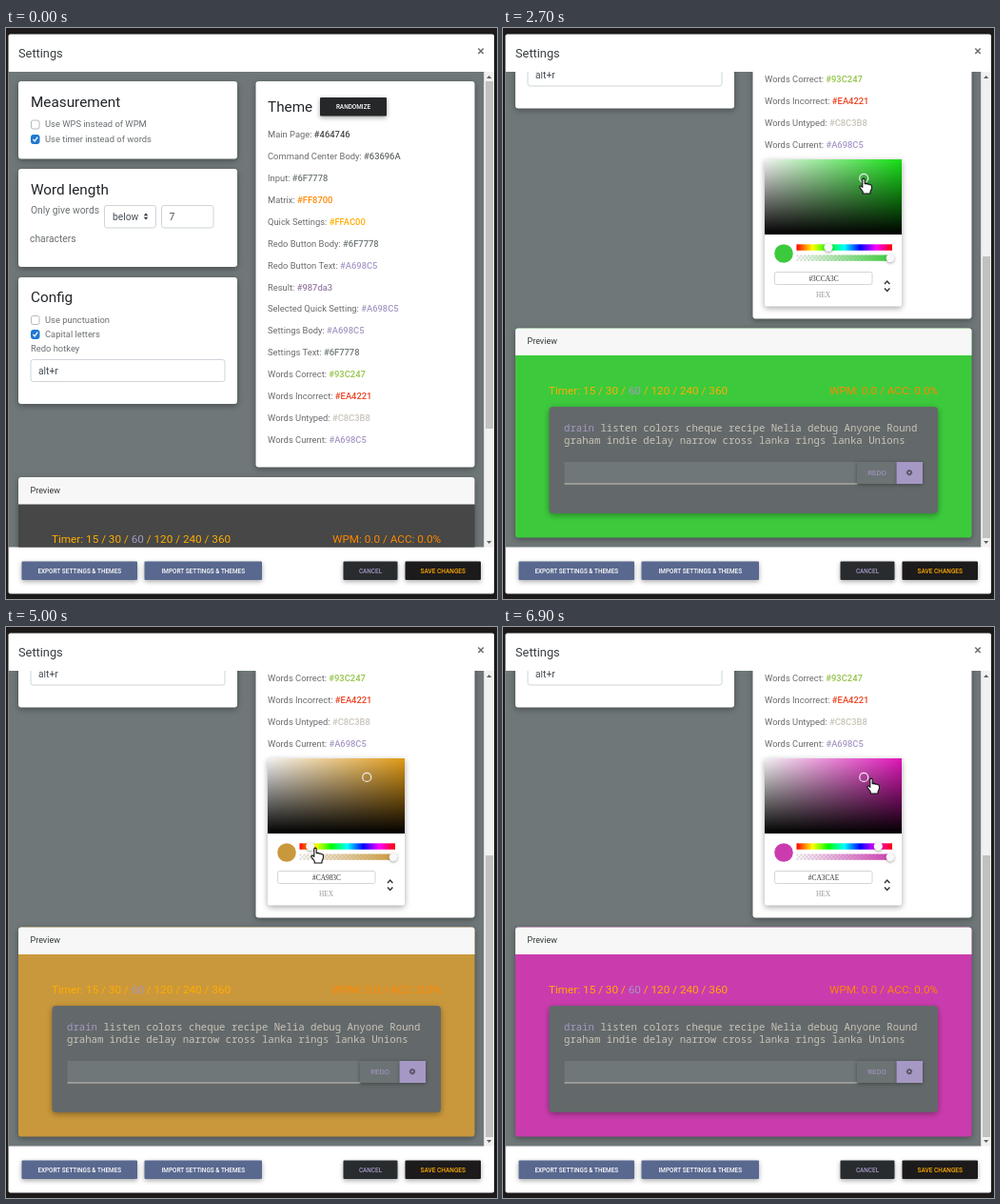
An HTML page with a canvas for the animation above (7000 ms loop, 516 by 600 pixels).

```html
<!DOCTYPE html>
<html lang="en">
<head>
<meta charset="utf-8">
<title>Settings</title>
<style>
html, body { margin: 0; width: 100%; height: 100%; overflow: hidden; background: #1c1a1b; }
canvas { display: block; width: 516px; height: 600px; }
</style>
</head>
<body>
<canvas id="stage"></canvas>
<script>
const W = 516, H = 600, LOOP = 7000, STEP = 100;
const canvas = document.getElementById('stage');
const ctx = canvas.getContext('2d');
const dpr = window.devicePixelRatio || 1;
canvas.width = W * dpr;
canvas.height = H * dpr;

const SANS = 'Roboto, sans-serif';
const MONO = '"Noto Sans Mono", monospace';
const SERIF = '"Liberation Serif", serif';
const SLATE = '#6f7778', LILAC = '#a698c5', ORANGE = '#ffac00';
const OPEN_AT = 700, MAX_SCROLL = 310.5, GROWTH = 155;

const THEME = [
  ['Main Page', '#464746'], ['Command Center Body', '#63696A'], ['Input', '#6F7778'],
  ['Matrix', '#FF8700'], ['Quick Settings', '#FFAC00'], ['Redo Button Body', '#6F7778'],
  ['Redo Button Text', '#A698C5'], ['Result', '#987da3'], ['Selected Quick Setting', '#A698C5'],
  ['Settings Body', '#A698C5'], ['Settings Text', '#6F7778'], ['Words Correct', '#93C247'],
  ['Words Incorrect', '#EA4221'], ['Words Untyped', '#C8C3B8'], ['Words Current', '#A698C5']
];

// Keyframes: [time, ...values]
const SCROLL = [[1200, 0], [1600, MAX_SCROLL]];
const HUE = [[3500, 120], [4300, 46], [4400, 46], [4900, 39], [5100, 39], [5700, 180], [6300, 311.8]];
const SHADE = [[2000, 0.014, 0.278], [2700, 0.703, 0.792]];
const POINTER = [
  [100, 420, 250], [600, 343, 110], [1200, 343, 110], [1600, 388, 262], [1800, 385, 257],
  [2000, 281, 199], [2700, 379, 158], [2900, 379, 158], [3400, 339, 232], [3500, 339, 232],
  [4300, 325, 231], [5000, 325, 232], [5100, 325, 232], [5700, 364, 234], [6300, 397, 233],
  [6500, 397, 233], [6900, 387, 159]
];

function tween(keys, t) {
  if (t <= keys[0][0]) return keys[0].slice(1);
  for (let i = 1; i < keys.length; i++) {
    const a = keys[i - 1], b = keys[i];
    if (t <= b[0]) {
      const k = (t - a[0]) / (b[0] - a[0]);
      return a.slice(1).map((v, j) => v + (b[j + 1] - v) * k);
    }
  }
  return keys[keys.length - 1].slice(1);
}

function hsvHex(h, s, v) {
  const channel = n => {
    const k = (n + h / 60) % 6;
    const c = v - v * s * Math.max(0, Math.min(k, 4 - k, 1));
    return Math.round(c * 255).toString(16).padStart(2, '0');
  };
  return ('#' + channel(5) + channel(3) + channel(1)).toUpperCase();
}

function box(x, y, w, h, fill, { r = 0, stroke, shadow = 0 } = {}) {
  ctx.save();
  ctx.beginPath();
  ctx.roundRect(x, y, w, h, r);
  if (shadow) {
    ctx.shadowColor = 'rgba(0,0,0,.35)';
    ctx.shadowBlur = shadow * dpr;
    ctx.shadowOffsetY = shadow * 0.35 * dpr;
  }
  ctx.fillStyle = fill;
  ctx.fill();
  ctx.restore();
  if (stroke) {
    ctx.lineWidth = 1;
    ctx.strokeStyle = stroke;
    ctx.stroke();
  }
}

function disc(x, y, r, fill, shadow) {
  box(x - r, y - r, 2 * r, 2 * r, fill, { r, shadow });
}

// Returns the x where the text ends
function text(str, x, y, size, color, { weight = 400, family = SANS, align = 'left' } = {}) {
  ctx.font = `${weight} ${size}px ${family}`;
  ctx.textAlign = align;
  ctx.fillStyle = color;
  ctx.fillText(str, x, y);
  return x + ctx.measureText(str).width;
}

function line(points, color, width) {
  ctx.beginPath();
  points.forEach(([x, y]) => ctx.lineTo(x, y));
  ctx.strokeStyle = color;
  ctx.lineWidth = width;
  ctx.stroke();
}

function triangle(x, y, w, h, color) {
  ctx.beginPath();
  ctx.moveTo(x - w, y);
  ctx.lineTo(x + w, y);
  ctx.lineTo(x, y + h);
  ctx.fillStyle = color;
  ctx.fill();
}

function button(label, x, y, w, h, fill, color, size = 6.4) {
  box(x, y, w, h, fill, { r: 1, shadow: 5 });
  text(label, x + w / 2, y + h / 2 + size * 0.36, size, color, { weight: 500, align: 'center' });
}

const card = (x, y, w, h) => box(x, y, w, h, '#fff', { r: 3, shadow: 6 });
const heading = (label, x, y) => text(label, x, y, 15.3, '#212529');
const field = (x, y, w, h) => box(x + 0.5, y + 0.5, w - 1, h - 1, '#fff', { r: 2.5, stroke: '#ced4da' });

function checkbox(label, y, on) {
  box(26.5, y - 4, 8.5, 9, on ? '#1f78d1' : '#fff', { r: 2, stroke: on ? '#1f78d1' : '#b4babf' });
  if (on) line([[28.5, 0.5 + y], [30.2, y + 2.4], [33.2, y - 1.8]], '#fff', 1.3);
  text(label, 41, y + 3.2, 9.4, '#6b6f72');
}

function drawOptions() {
  card(13, 56, 230, 81.5);
  heading('Measurement', 26, 83);
  checkbox('Use WPS instead of WPM', 101, false);
  checkbox('Use timer instead of words', 116.5, true);

  card(13, 148, 230, 103);
  heading('Word length', 26, 174.5);
  text('Only give words', 26, 195, 10.3, '#6b6f72');
  field(103, 186, 55, 24.5);
  text('below', 112, 201.7, 10.3, '#495057');
  triangle(147, 197.2, 2.3, -2.7, '#343a40');
  triangle(147, 198.8, 2.3, 2.7, '#343a40');
  field(163, 186, 55.5, 24.5);
  text('7', 171.5, 201.7, 10.3, '#495057');
  text('characters', 25, 225, 10.3, '#6b6f72');

  card(13, 262, 230, 133);
  heading('Config', 26, 288);
  checkbox('Use punctuation', 306.5, false);
  checkbox('Capital letters', 321.5, true);
  text('Redo hotkey', 26, 339.7, 9.4, '#6b6f72');
  field(25.5, 348, 205, 24);
  text('alt+r', 34, 363.7, 10.3, '#495057');
}

function drawTheme(open, main) {
  card(262.5, 56, 230, open ? 405 + GROWTH : 405.5);
  heading('Theme', 275, 88);
  button('RANDOMIZE', 330, 73, 70, 19.5, '#252729', '#fff');
  THEME.forEach(([label, value], i) => {
    const y = 115 + i * 22.93;
    const hex = i ? value : main;
    const end = text(label + ': ', 275, y, 9.4, '#6b6b6b');
    text(hex, end, y, 9.4, hex, { weight: 500 });
  });
}

function gradientBar(x, y, w, h, colors) {
  const g = ctx.createLinearGradient(x, 0, x + w, 0);
  colors.forEach((c, i) => g.addColorStop(i / (colors.length - 1), c));
  ctx.fillStyle = g;
  ctx.fillRect(x, y, w, h);
}

function drawPicker(hue, sat, val, color) {
  const x = 275, y = 448.5, w = 144, h = 79;
  box(x, y, w, 154.5, '#fff', { r: 2, shadow: 6 });
  gradientBar(x, y, w, h, ['#f2f2f2', hsvHex(hue, 0.9, 0.88)]);
  const dark = ctx.createLinearGradient(0, y, 0, y + h);
  dark.addColorStop(0, 'rgba(0,0,0,0)');
  dark.addColorStop(1, '#000');
  ctx.fillStyle = dark;
  ctx.fillRect(x, y, w, h);
  ctx.beginPath();
  ctx.arc(x + 3 + sat * w, y + 3.5 + (1 - val) * h, 4.5, 0, 2 * Math.PI);
  ctx.lineWidth = 1.2;
  ctx.strokeStyle = '#eee';
  ctx.stroke();

  disc(295, y + 99, 9.8, color);
  gradientBar(308.5, y + 89.3, 100.5, 6.5,
    ['#f00', '#ff0', '#0f0', '#0ff', '#00f', '#f0f', '#f00']);
  disc(309.2 + hue * 0.273, y + 92.5, 4.6, '#f8f8f8', 3);

  for (let i = 0; i < 50; i++) {
    for (let j = 0; j < 3; j++) {
      ctx.fillStyle = (i + j) % 2 ? '#fff' : '#d8d8d8';
      ctx.fillRect(308.5 + i * 2, y + 100.5 + j * 2.1, 2, 2.1);
    }
  }
  gradientBar(308.5, y + 100.5, 100.5, 6.3, [color + '00', color]);
  disc(407, y + 103.8, 4.4, '#f8f8f8', 3);

  box(285.5, y + 118.5, 102.5, 13, '#fff', { r: 2, stroke: '#d5d5d5' });
  text(color, 337, y + 127.8, 7.4, '#333', { family: SERIF, align: 'center' });
  text('HEX', 336.5, y + 145, 7.4, '#969696', { family: SERIF, align: 'center' });
  line([[401, y + 131], [403.7, y + 128], [406.4, y + 131]], '#333', 1.4);
  line([[401, y + 135.5], [403.7, y + 138.5], [406.4, y + 135.5]], '#333', 1.4);
}

function drawGear(x, y) {
  ctx.beginPath();
  for (let i = 0; i < 32; i++) {
    const a = i / 32 * 2 * Math.PI;
    const r = i % 4 < 2 ? 3.4 : 2.6;
    ctx.lineTo(x + r * Math.cos(a), y + r * Math.sin(a));
  }
  ctx.fillStyle = '#55505f';
  ctx.fill();
  disc(x, y, 1.1, LILAC);
}

function drawPreview(y, main) {
  box(13, y, 479.5, 220, main, { r: 3, shadow: 6 });
  box(13, y, 479.5, 28.5, '#f7f7f7', { r: [3, 3, 0, 0] });
  text('Preview', 25.5, y + 16.5, 9, '#33373a');

  let x = text('Timer: 15 / 30 / ', 48, y + 69.3, 11.72, ORANGE);
  x = text('60', x, y + 69.3, 11.72, LILAC);
  text(' / 120 / 240 / 360', x, y + 69.3, 11.72, ORANGE);
  text('WPM: 0.0 / ACC: 0.0%', 343, y + 69.3, 11.72, '#ff8700');

  box(48.5, y + 82.5, 408.5, 112, '#63696a', { r: 4, shadow: 6 });
  const mono = { family: MONO };
  x = text('drain', 64, y + 108.5, 10.68, LILAC, mono);
  text(' listen colors cheque recipe Nelia debug Anyone Round', x, y + 108.5, 10.68, '#c8c3b8', mono);
  text('graham indie delay narrow cross lanka rings lanka Unions', 64, y + 121.3, 10.68, '#c8c3b8', mono);

  box(64.5, y + 140.5, 308, 23, SLATE);
  box(64.5, y + 163, 308, 1, '#c8c3b8');
  box(372, y + 140.5, 41.5, 23, '#6c7375', { shadow: 4 });
  text('REDO', 393, y + 154.5, 7.8, LILAC, { align: 'center' });
  box(413.5, y + 140.5, 27.5, 23, LILAC, { shadow: 4 });
  drawGear(427, y + 151.7);
}

function drawScrollbar(open, scroll) {
  box(502.5, 46, 10.5, 499.5, '#f1f1f1');
  triangle(507.7, 53, 2.6, -3, '#606060');
  triangle(507.7, 539, 2.6, 3, '#606060');
  box(504, 56 + scroll / MAX_SCROLL * 184, 8, open ? 296 : 365, '#c1c1c1');
}

function drawFrame() {
  text('Settings', 13, 31, 12.8, '#3a3e41');
  line([[496.3, 21.5], [501.7, 27]], '#6d6d6d', 1.5);
  line([[501.7, 21.5], [496.3, 27]], '#6d6d6d', 1.5);
  button('EXPORT SETTINGS & THEMES', 16.5, 560.5, 121.5, 19.5, '#59688f', '#fff');
  button('IMPORT SETTINGS & THEMES', 145.5, 560.5, 123.5, 19.5, '#59688f', '#fff');
  button('CANCEL', 354.5, 560.5, 57, 19.5, '#282c2e', LILAC);
  button('SAVE CHANGES', 419.5, 560.5, 79.5, 19.5, '#1c1a1a', ORANGE, 6.5);
}

const ARROW = new Path2D('M0 0V11.5L2.6 9.1L4.3 13L6.2 12.2L4.5 8.4H8Z');
const HAND = new Path2D('M-1.2 .8Q0-.6 1.2 .8V5.6L3 5.4Q4 5.4 4.3 6.2Q6 5.7 6.4 6.8Q8.4 6.4 8.4 8.2' +
  'V11L7 14V16H-.8V14L-4.2 9.4Q-4.2 7.6-2.4 8.2L-1.2 9.4Z');

function drawPointer(t) {
  if (t < 100) return;
  const [x, y] = tween(POINTER, t);
  const hand = (t >= 600 && t < 1300) || t >= 2000;
  const shape = hand ? HAND : ARROW;
  ctx.save();
  ctx.translate(x, y);
  ctx.lineJoin = 'round';
  ctx.lineWidth = 1.1;
  ctx.fillStyle = '#fff';
  ctx.strokeStyle = '#111';
  ctx.fill(shape);
  ctx.stroke(shape);
  ctx.restore();
}

function draw(t) {
  const open = t >= OPEN_AT;
  const [scroll] = tween(SCROLL, t);
  const [hue] = tween(HUE, t);
  const [sat, val] = tween(SHADE, t);
  const main = hsvHex(hue, sat, val);

  ctx.setTransform(dpr, 0, 0, dpr, 0, 0);
  box(0, 0, W, H, '#1c1a1b');
  box(2.5, 6.5, 510.5, 588, '#fff', { r: 2 });
  box(2.5, 46, 500, 499.5, SLATE);

  ctx.save();
  ctx.beginPath();
  ctx.rect(2.5, 46, 500, 499.5);
  ctx.clip();
  ctx.translate(0, -scroll);
  drawOptions();
  drawTheme(open, main);
  if (open) drawPicker(hue, sat, val, main);
  drawPreview(open ? 471.5 + GROWTH - 0.5 : 472, main);
  ctx.restore();

  drawScrollbar(open, scroll);
  drawFrame();
  drawPointer(t);
}

const start = performance.now();
function tick() {
  const t = (performance.now() - start) % LOOP;
  draw(Math.floor(t / STEP) * STEP);
  requestAnimationFrame(tick);
}
tick();
</script>
</body>
</html>
```
